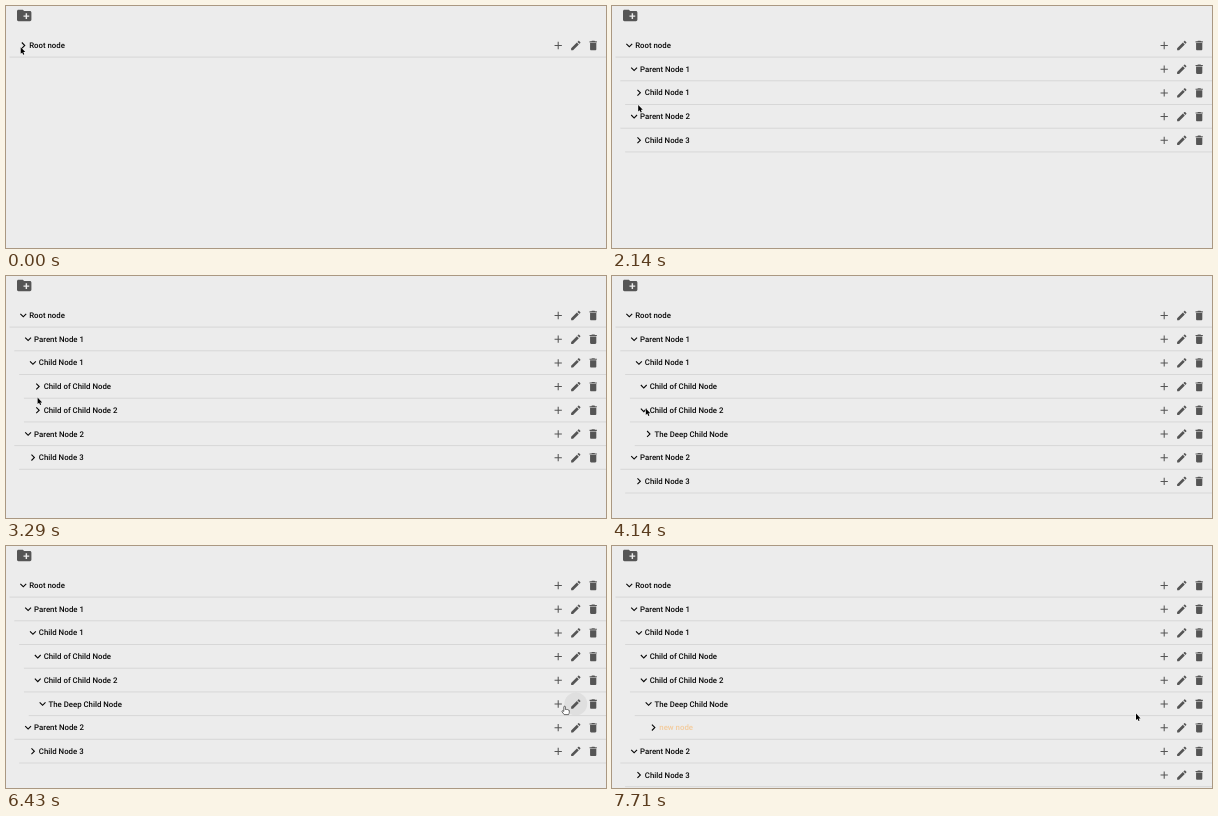
Write an HTML page that moves like this. It is 600 px wide and 242 px high and loops after 8000 ms.

```html
<!DOCTYPE html>
<html lang="en">
<head>
<meta charset="utf-8">
<title>Tree view</title>
<style>
  html, body { margin: 0; width: 100%; height: 100%; overflow: hidden; background: #ececec; }
  svg { display: block; width: 100%; height: 100%; }
  text { font: 500 7.82px Roboto, sans-serif; fill: #080808; text-rendering: geometricPrecision; }
  .icon { fill: #555; }
  .chevron { fill: #080808; }
  .fresh { fill: #f3cb9c; }
</style>
</head>
<body>
<svg id="stage" viewBox="0 0 600 242">
  <defs>
    <path id="add" d="M19 13h-6v6h-2v-6H5v-2h6V5h2v6h6v2z"/>
    <path id="edit" d="M3 17.25V21h3.75L17.81 9.94l-3.75-3.75L3 17.25zM20.71 7.04c.39-.39.39-1.02 0-1.41l-2.34-2.34c-.39-.39-1.02-.39-1.41 0l-1.83 1.83 3.75 3.75 1.83-1.83z"/>
    <path id="trash" d="M6 19c0 1.1.9 2 2 2h8c1.1 0 2-.9 2-2V7H6v12zM19 4h-3.5l-1-1h-5l-1 1H5v2h14V4z"/>
    <path id="folder" d="M20 6h-8l-2-2H4c-1.11 0-1.99.89-1.99 2L2 18c0 1.11.89 2 2 2h16c1.11 0 2-.89 2-2V8c0-1.11-.89-2-2-2zm-1 8h-3v3h-2v-3h-3v-2h3V9h2v3h3v2z"/>
    <path id="closed" d="M10 6L8.59 7.41 13.17 12l-4.58 4.59L10 18l6-6z"/>
    <path id="opened" d="M16.59 8.59L12 13.17 7.41 8.59 6 10l6 6 6-6z"/>
  </defs>
</svg>
<script>
const LOOP = 8000, STEPS_PER_MS = 7 / 1000;
const TOP = 39.4, PITCH = 23.7, INDENT = 4.82;
const ADD_X = 552.2, EDIT_X = 569.8, TRASH_X = 587.2;
const stage = document.getElementById('stage');

// Pointer stops: step, x, y and what is clicked there, if anything.
const stops = [
  [0, 14.7, 41.3],
  [1, 14.7, 41.3, 'Root node'],
  [4, 14.7, 41.3],
  [8, 23.7, 62.2, 'Parent Node 1'],
  [13, 22.7, 110.4, 'Parent Node 2'],
  [18, 29, 89.8, 'Child Node 1'],
  [23, 31.6, 121.6],
  [25, 31.6, 117.6, 'Child of Child Node'],
  [28, 33.8, 132.4, 'Child of Child Node 2'],
  [32, 14, 122],
  [37, 34.6, 157.5, 'The Deep Child Node'],
  [45, 558.8, 160.2],
  [47, 554, 159],
  [49, 554, 159, 'add'],
  [54, 524, 167.6]
].map(([step, x, y, target]) => ({ step, x, y, target }));

// A click takes effect one step later.
function effectOf(target) {
  const stop = stops.find(s => s.target === target);
  return stop ? stop.step + 1 : Infinity;
}

const node = (label, ...children) => ({ label, children, opensAt: effectOf(label), addedAt: 0 });
const fresh = { ...node('new node'), addedAt: effectOf('add') };
const tree = node('Root node',
  node('Parent Node 1',
    node('Child Node 1',
      node('Child of Child Node'),
      node('Child of Child Node 2',
        node('The Deep Child Node', fresh)))),
  node('Parent Node 2',
    node('Child Node 3')));

function make(tag, attrs, parent = stage) {
  const el = document.createElementNS('http://www.w3.org/2000/svg', tag);
  for (const key in attrs) el.setAttribute(key, attrs[key]);
  return parent.appendChild(el);
}

function icon(name, x, y, parent, scale = 0.52, kind = 'icon') {
  return make('use', {
    href: '#' + name, class: kind,
    transform: `translate(${x} ${y}) scale(${scale}) translate(-12 -12)`
  }, parent);
}

const show = (el, on) => el.setAttribute('visibility', on ? 'inherit' : 'hidden');
const place = (el, x, y) => el.setAttribute('transform', `translate(${x} ${y})`);

function buildRow(item, depth = 0) {
  const shift = depth * INDENT;
  const g = item.g = make('g', {});
  make('path', { d: `M${3.5 + shift} 11.7H600`, stroke: '#d2d2d2', 'stroke-width': 0.8 }, g);
  const text = make('text', { x: 23.2 + shift, y: 2.6, class: item === fresh ? 'fresh' : '' }, g);
  text.textContent = item.label;
  item.closed = icon('closed', 17.3 + shift, 0, g, 0.55, 'chevron');
  item.opened = icon('opened', 17.3 + shift, 0, g, 0.55, 'chevron');
  icon('add', ADD_X, 0.1, g);
  icon('edit', EDIT_X, 0.1, g);
  icon('trash', TRASH_X, 0.1, g);
  item.children.forEach(child => buildRow(child, depth + 1));
}

const hover = make('circle', { r: 11.4, cy: TOP + 5 * PITCH, fill: '#dfdfdf' });
icon('folder', 18.2, 9.4, stage, 0.72);
buildRow(tree);

const ring = make('circle', { r: 10.4, fill: 'none', stroke: '#111', 'stroke-width': 0.9 });
const arrow = make('path', {
  d: 'M0 0V6.5L1.5 5.2 2.5 7.5 3.6 7 2.6 4.8H4.6z',
  fill: '#000', stroke: '#fff', 'stroke-width': 0.8, 'paint-order': 'stroke'
});
const hand = make('path', {
  d: 'M-1 5.2V.8Q-1 0-.2 0T.6.8V3.3Q1.4 2.7 2 3.5 2.8 3 3.3 3.8 4.4 3.4 4.5 4.6V6.2Q4.3 7.4 3.8 8.4H-.6L-2.8 5.6Q-2.8 4.3-2 4.5z',
  fill: '#fff', stroke: '#222', 'stroke-width': 0.65, 'stroke-linejoin': 'round'
});

// Rests for a step after a click, then eases out towards the next stop.
function pointerAt(step) {
  const i = stops.findIndex(s => s.step > step);
  if (i < 0) return stops[stops.length - 1];
  const from = stops[i - 1], to = stops[i];
  const leave = from.step + (from.target ? 1 : 0);
  const arrive = to.step - (to.target ? 1 : 0);
  const u = Math.min(1, Math.max(0, (step - leave) / Math.max(1, arrive - leave)));
  const k = 1 - (1 - u) ** 2;
  return { x: from.x + (to.x - from.x) * k, y: from.y + (to.y - from.y) * k };
}

// Lays out a subtree from the given line and returns the next free line.
function layout(item, step, line, shown = true) {
  const open = step >= item.opensAt;
  shown = shown && step >= item.addedAt;
  show(item.g, shown);
  show(item.opened, shown && open);
  show(item.closed, shown && !open);
  if (shown) place(item.g, 0, TOP + PITCH * line++);
  for (const child of item.children) line = layout(child, step, line, shown && open);
  return line;
}

function render(ms) {
  const step = Math.floor((ms % LOOP + 5) * STEPS_PER_MS);
  layout(tree, step, 0);

  const { x, y } = pointerAt(step);
  const overIcon = x > 545;
  [arrow, hand, ring].forEach(el => place(el, x, y));
  show(arrow, !overIcon);
  show(hand, overIcon);
  show(ring, stops.some(s => s.target && s.step === step));

  hover.setAttribute('cx', x > 557 ? EDIT_X : ADD_X);
  show(hover, overIcon);
}

function tick() {
  render(performance.now());
  requestAnimationFrame(tick);
}
tick();
</script>
</body>
</html>
```
